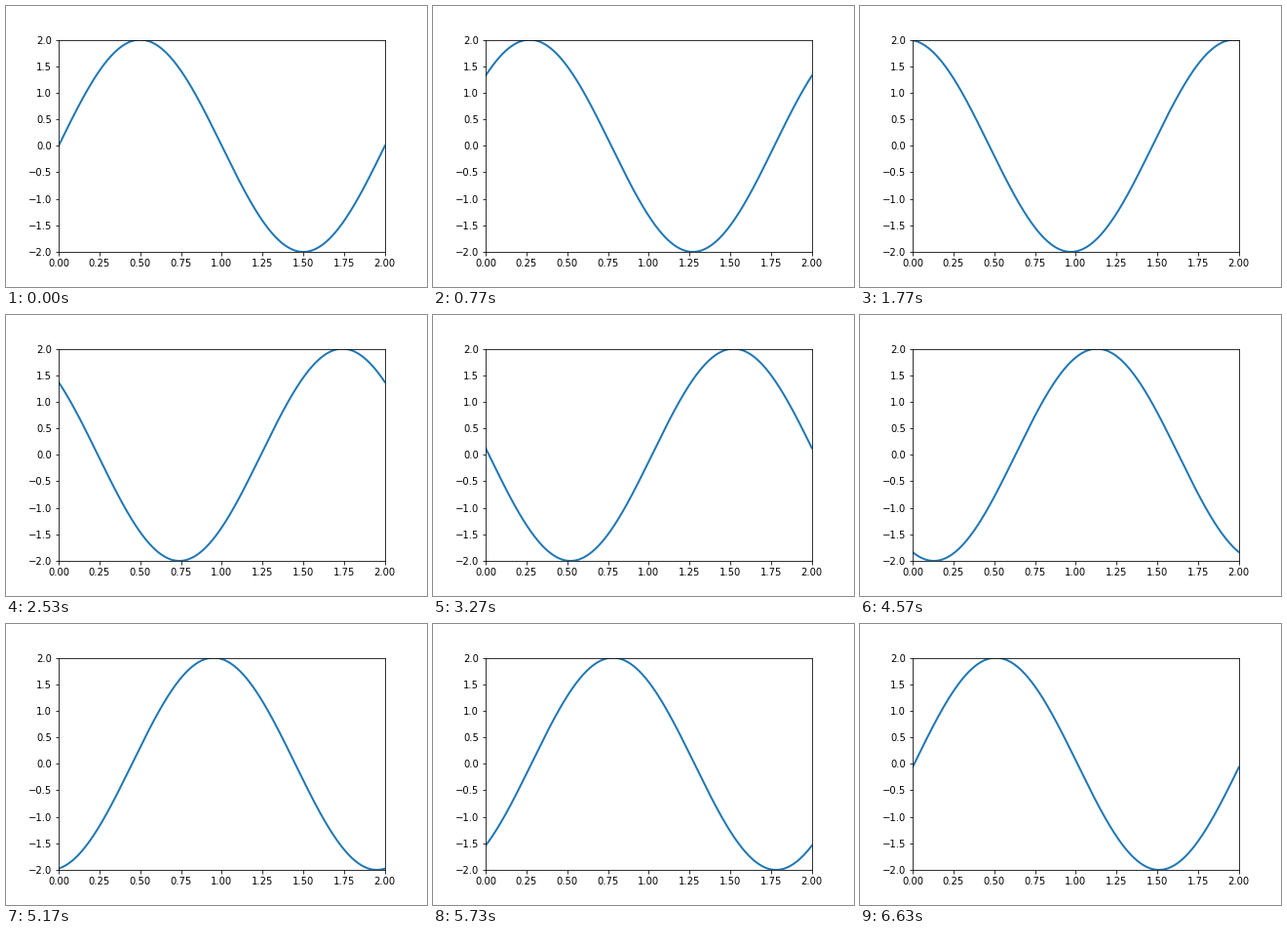
These frames come from a looping animation (432 px wide and 288 px high, 6660 ms). A matplotlib script:

```python
import numpy as np
import matplotlib.pyplot as plt
from matplotlib.animation import FuncAnimation

FRAMES = 200
LOOP_MS = 6660

plt.rcParams["font.family"] = "DejaVu Sans"
plt.rcParams["font.size"] = 10

fig, ax = plt.subplots(figsize=(6, 4), dpi=72, facecolor="white")
fig.subplots_adjust(left=0.125, right=0.9, bottom=0.125, top=0.88)
ax.set(xlim=(0, 2), ylim=(-2, 2))

x = np.linspace(0, 2, 1000)
line, = ax.plot([], [], color="#1f77b4", lw=2)


def update(i):
    # The wave travels left by one full period per loop.
    line.set_data(x, 2 * np.sin(np.pi * (x + 2 * i / FRAMES)))
    return line,


anim = FuncAnimation(fig, update, frames=FRAMES, interval=LOOP_MS / FRAMES,
                     repeat=True, repeat_delay=0)
plt.show()
```
